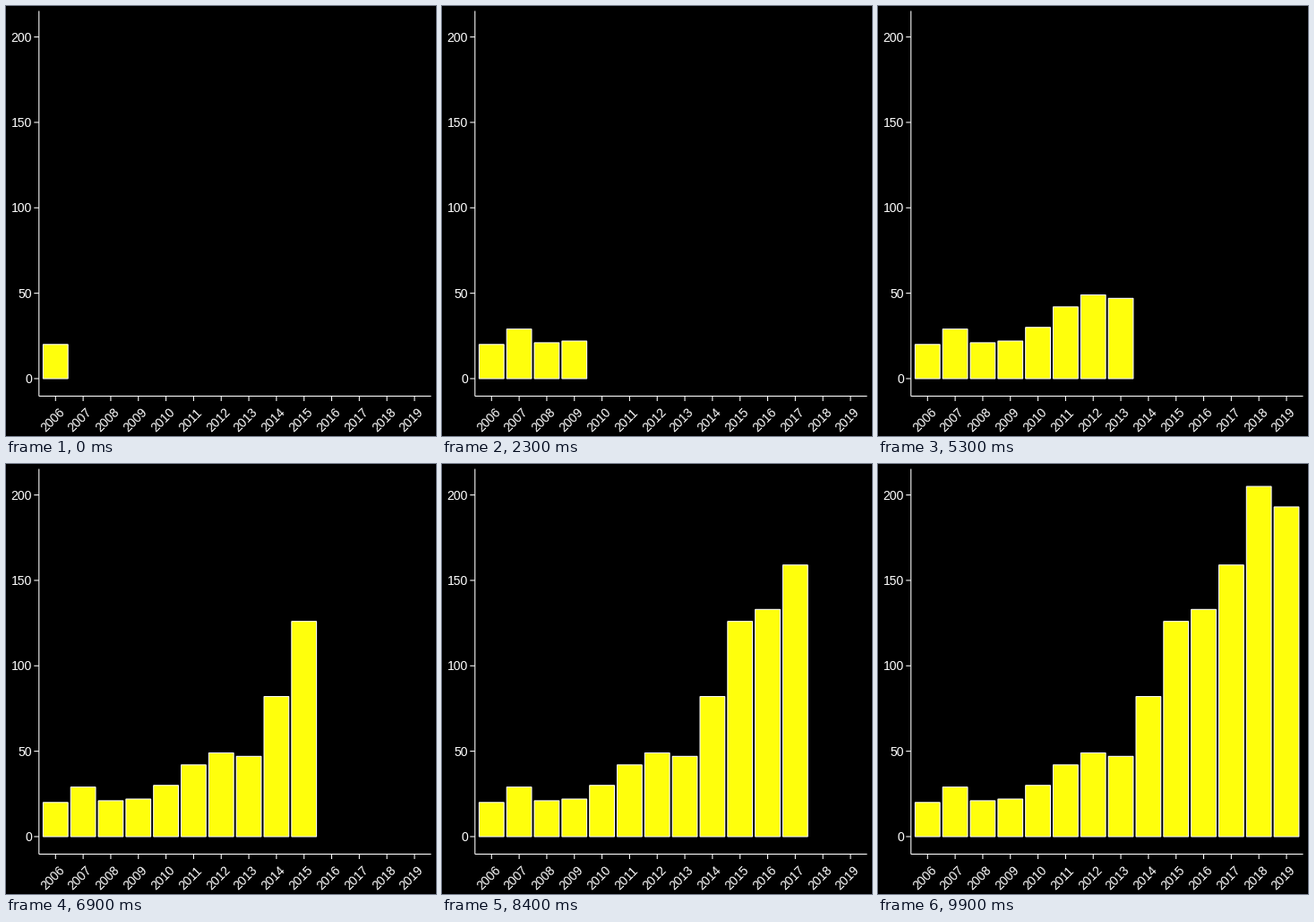
A matplotlib script that plays this animation: 480x480 px, repeating every 10000 ms.

```python
import matplotlib.pyplot as plt
from matplotlib.animation import FuncAnimation
from matplotlib.patches import Rectangle

SIZE, FRAMES, INTERVAL = 480, 100, 100
LEFT, RIGHT, TOP, BOTTOM = 36.8, 474.5, 5.5, 435.5
TICK, LINE = 5.5, 1.07
YEARS = range(2006, 2020)
VALUES = [20, 29, 21, 22, 30, 42, 49, 47, 82, 126, 133, 159, 205, 193]

plt.rcParams["font.family"] = "Liberation Sans"
STEP = (RIGHT - LEFT) / (len(VALUES) - 1 + 1.2)
UNIT = (BOTTOM - TOP) / (1.1 * max(VALUES))
ZERO = BOTTOM - 0.05 * max(VALUES) * UNIT
STARTS = [round(i * (FRAMES - 1) / (len(VALUES) - 1)) for i in range(len(VALUES))]


def x_pos(i):
    return LEFT + (i + 0.6) * STEP


def y_pos(value):
    return ZERO - value * UNIT


fig = plt.figure(figsize=(SIZE / 72, SIZE / 72), dpi=72, facecolor="black")
ax = fig.add_axes([0, 0, 1, 1])
ax.set_xlim(0, SIZE)
ax.set_ylim(SIZE, 0)
ax.axis("off")


def line(x0, y0, x1, y1):
    ax.plot([x0, x1], [y0, y1], color="white", lw=LINE,
            solid_capstyle="butt", snap=False)


def label(x, y, text, **style):
    ax.text(x, y, text, color="white", fontsize=14, va="baseline", **style)


line(LEFT, TOP, LEFT, BOTTOM)
line(LEFT, BOTTOM, RIGHT, BOTTOM)

for value in range(0, 201, 50):
    y = y_pos(value)
    line(LEFT - TICK, y, LEFT, y)
    label(29, y + 5, str(value), ha="right")

bars = []
for i, (year, value) in enumerate(zip(YEARS, VALUES)):
    x = x_pos(i)
    line(x, BOTTOM, x, BOTTOM + TICK)
    label(x - 0.4, 465, str(year), ha="center",
          rotation=45, rotation_mode="anchor")
    bar = Rectangle((x - 0.45 * STEP, y_pos(value)), 0.9 * STEP, value * UNIT,
                    facecolor="#ffff0c", edgecolor="white", lw=LINE,
                    joinstyle="miter", snap=False, zorder=3)
    bars.append(ax.add_patch(bar))


def update(frame):
    for bar, start in zip(bars, STARTS):
        bar.set_visible(frame >= start)
    return bars


anim = FuncAnimation(fig, update, frames=FRAMES, interval=INTERVAL,
                     init_func=lambda: update(0), repeat=True, repeat_delay=0)
plt.show()
```
